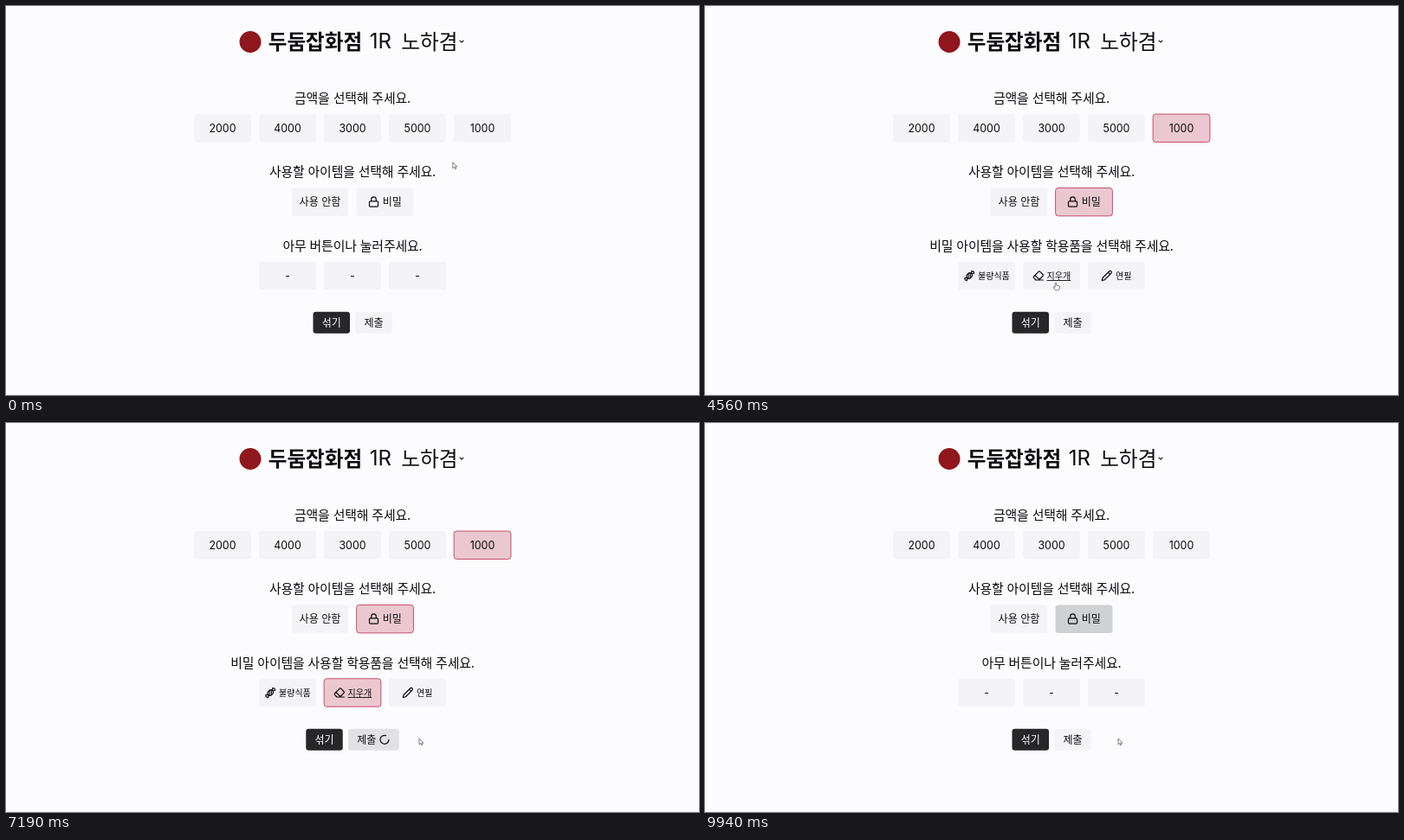
Write an HTML page that moves like this. It is 800 by 450 pixels and loops after 10 s.

```html
<!DOCTYPE html>
<html lang="ko">
<head>
<meta charset="utf-8">
<title>선택 화면</title>
<style>
  html, body { margin: 0; width: 100%; height: 100%; overflow: hidden; background: #fcfbfe; }
  svg { display: block; width: 800px; height: 450px; }
  text { font-family: 'Noto Sans CJK KR', 'Noto Sans CJK', 'Noto Sans', sans-serif; fill: #0c0c0f; }
  .num { font-family: Inter, Roboto, sans-serif; }
  .mid { text-anchor: middle; }
  .head { text-anchor: middle; letter-spacing: -.15px; }
  .icon { fill: none; stroke: #0c0c0f; stroke-width: 2.2; stroke-linecap: round; stroke-linejoin: round; }
  .cursor { fill: #fff; stroke: #55565c; stroke-width: .8; stroke-linejoin: round; }
</style>
</head>
<body>
<svg id="stage" viewBox="0 0 800 450"></svg>
<script>
const LOOP = 10000;
const PLAIN = [244, 244, 246], PINK = [235, 200, 208], GREY = [208, 209, 211], BUSY = [226, 226, 229];
const BORDER = '#c0405e';
const W = 66.67, H = 33.33, PITCH = 75;

const ICONS = {
  lock: 'M5 11h14a2 2 0 0 1 2 2v7a2 2 0 0 1-2 2H5a2 2 0 0 1-2-2v-7a2 2 0 0 1 2-2zM7 11V7a5 5 0 0 1 10 0v4',
  eraser: 'm7 21-4.3-4.3c-1-1-1-2.5 0-3.4l9.6-9.6c1-1 2.5-1 3.4 0l5.6 5.6c1 1 1 2.5 0 3.4L13 21M22 21H7M5 11l9 9',
  pencil: 'M17 3a2.85 2.83 0 1 1 4 4L7.5 20.5 2 22l1.5-5.5ZM15 5l4 4',
  candy: 'm9.5 7.5-2 2a4.95 4.95 0 1 0 7 7l2-2a4.95 4.95 0 1 0-7-7ZM14 6.5v10M10 7.5v10M16 7l1-5 1.4.7A3 3 0 0 0 19.7 3H21v1.3c0 .5.1.9.3 1.3L22 7l-5 1M8 17l-1 5-1.4-.7A3 3 0 0 0 4.3 21H3v-1.3a3 3 0 0 0-.3-1.3L2 17l5-1',
  check: 'M20 6 9 17l-5-5',
  loader: 'M21 12a9 9 0 1 1-6.22-8.56'
};

const stage = document.getElementById('stage');

function add(tag, attrs, parent = stage) {
  const el = document.createElementNS('http://www.w3.org/2000/svg', tag);
  set(el, attrs);
  parent.appendChild(el);
  return el;
}
function set(el, attrs) {
  for (const k in attrs) el.setAttribute(k, attrs[k]);
}
function label(str, x, y, size, cls = '', parent = stage, extra = {}) {
  const el = add('text', { x, y, 'font-size': size, class: cls, ...extra }, parent);
  el.textContent = str;
  return el;
}
function heading(str, y, parent = stage) {
  return label(str, 400, y, 14.9, 'head', parent);
}
function icon(name, cx, cy, parent = stage) {
  const g = add('g', { transform: `translate(${cx} ${cy}) scale(.555)` }, parent);
  const spin = add('g', {}, g);
  add('path', { d: ICONS[name], class: 'icon', transform: 'translate(-12 -12)' }, spin);
  return spin;
}
function box(x, y, w, h) {
  return add('rect', { x: x + .45, y: y + .45, width: w - .9, height: h - .9, rx: 3.2, 'stroke-width': .9, stroke: BORDER, 'stroke-opacity': 0, fill: rgb(PLAIN) });
}
function row(count, y) {
  const left = 400 - (count * PITCH - 8.33) / 2;
  return Array.from({ length: count }, (_, i) => box(left + i * PITCH, y, W, H));
}
function rgb(c) { return `rgb(${c.map(Math.round).join()})`; }
function mix(a, b, k) { return a.map((v, i) => v + (b[i] - v) * k); }
function ramp(t, from, to) { return Math.min(1, Math.max(0, (t - from) / (to - from))); }
function ease(k) { return k * k * (3 - 2 * k); }
function show(el, on) { el.setAttribute('visibility', on ? 'inherit' : 'hidden'); }
function paint(el, k, base = PLAIN) {
  set(el, { fill: rgb(mix(base, PINK, k)), 'stroke-opacity': k });
}

// header
add('rect', { width: 800, height: 450, fill: '#fcfbfe' });
add('rect', { y: 449, width: 800, height: 1, fill: '#f3f3f5' });
add('circle', { cx: 282, cy: 41.5, r: 12.5, fill: '#8f171d' });
label('두둠잡화점', 302.7, 49.8, 23.6, '', stage, { 'font-weight': 700 });
label('1R', 419.8, 49.4, 24, 'num');
label('노하겸', 456.3, 49.8, 23.6);
add('path', { d: 'M524 40.1l2 1.8 2-1.8', fill: 'none', stroke: '#0c0c0f', 'stroke-width': 1.1, 'stroke-linecap': 'round' });

// amounts
heading('금액을 선택해 주세요.', 112.1);
const amounts = row(5, 124.6);
[2000, 4000, 3000, 5000, 1000].forEach((n, i) => label(n, 250 + i * PITCH, 145.6, 12.4, 'num mid'));

// items
heading('사용할 아이템을 선택해 주세요.', 197.2);
const items = row(2, 210);
label('사용 안함', 362.5, 231, 12.1, 'mid');
icon('lock', 424.5, 226.5);
label('비밀', 434.8, 231, 12);

// supplies
const supplies = row(3, 295.3);
const idle = add('g', {}), open = add('g', {});
heading('아무 버튼이나 눌러주세요.', 282.8, idle);
[325, 400, 475].forEach(x => label('-', x, 316.2, 12, 'num mid', idle));
heading('비밀 아이템을 사용할 학용품을 선택해 주세요.', 282.8, open);
[['candy', 305.2, '불량식품', 315], ['eraser', 384.8, '지우개', 394.6], ['pencil', 463.8, '연필', 474]].forEach(([name, cx, str, x]) => {
  icon(name, cx, 312, open);
  label(str, x, 315.8, 10, '', open);
});
add('rect', { x: 394.6, y: 317, width: 27.6, height: .9, fill: '#0c0c0f' }, open);

// actions
const shuffle = add('g', {}), submit = add('g', {});
add('rect', { y: 353.8, width: 42.5, height: 25, rx: 3.3, fill: '#27272a' }, shuffle);
label('섞기', 21.25, 370.6, 12, 'mid', shuffle, { 'font-weight': 500, style: 'fill:#fff' });
const submitBox = add('rect', { y: 353.8, height: 25, rx: 3.3 }, submit);
label('제출', 21.25, 370.6, 12, 'mid', submit);
const loader = icon('loader', 42, 366.3, submit);
const check = icon('check', 42, 366.3, submit);

// pointers, drawn with the hot spot at 0,0
const arrow = add('path', { class: 'cursor', d: 'M0 0V7.6L1.8 6 3 8.6 4.1 8.1 3 5.6H5.3Z' });
const hand = add('path', { class: 'cursor', d: 'M-.9.8Q0-.7.9.8V3.6L4.2 4.3Q5.2 4.6 5 5.8L4.4 8.6Q4 10-.3 9.8L-3 6.3Q-3.2 5-2 5.2L-.9 6.2Z' });

// time, x, y, shape
const POINTER = [
  [0, 515.8, 180.8, arrow],
  [750, 523, 168, arrow],
  [810, 530, 157, arrow],
  [880, 534.5, 151, hand],
  [2940, 432.8, 223.7, hand],
  [4560, 405, 319.9, hand],
  [5630, 413, 337.5, arrow],
  [6130, 424.5, 366, hand],
  [6700, 477, 365, arrow]
];

const PICK = [1250, 1630], SECRET = [3140, 3560], ERASER = [4570, 4880];
const LOAD = 6250, DONE = 9310, RESET = 9750;

function render(t) {
  const live = t < RESET;
  const picked = span => live ? ease(ramp(t, ...span)) : 0;
  paint(amounts[4], picked(PICK));
  paint(items[1], picked(SECRET), live ? PLAIN : GREY);
  paint(supplies[1], picked(ERASER));

  const opened = live && t >= 3190;
  show(open, opened);
  show(idle, !opened);

  const wide = live && t >= LOAD, done = wide && t >= DONE;
  const left = wide ? 346.25 : 354.5;
  set(shuffle, { transform: `translate(${left} 0)` });
  set(submit, { transform: `translate(${left + 48.7} 0)` });
  const tone = done ? PINK : live ? mix(PLAIN, BUSY, ramp(t, 6130, 6380)) : PLAIN;
  set(submitBox, { width: wide ? 58.8 : 42.5, fill: rgb(tone) });
  show(loader, wide && !done);
  show(check, done);
  set(loader, { transform: `rotate(${(t - 7190) * .36})` });

  const [, x, y, shape] = POINTER.filter(p => p[0] <= t).pop();
  show(arrow, shape === arrow);
  show(hand, shape === hand);
  set(shape, { transform: `translate(${x} ${y}) scale(.92)` });
}

const start = performance.now();
function tick() {
  render((performance.now() - start) % LOOP);
  requestAnimationFrame(tick);
}
tick();
</script>
</body>
</html>
```
